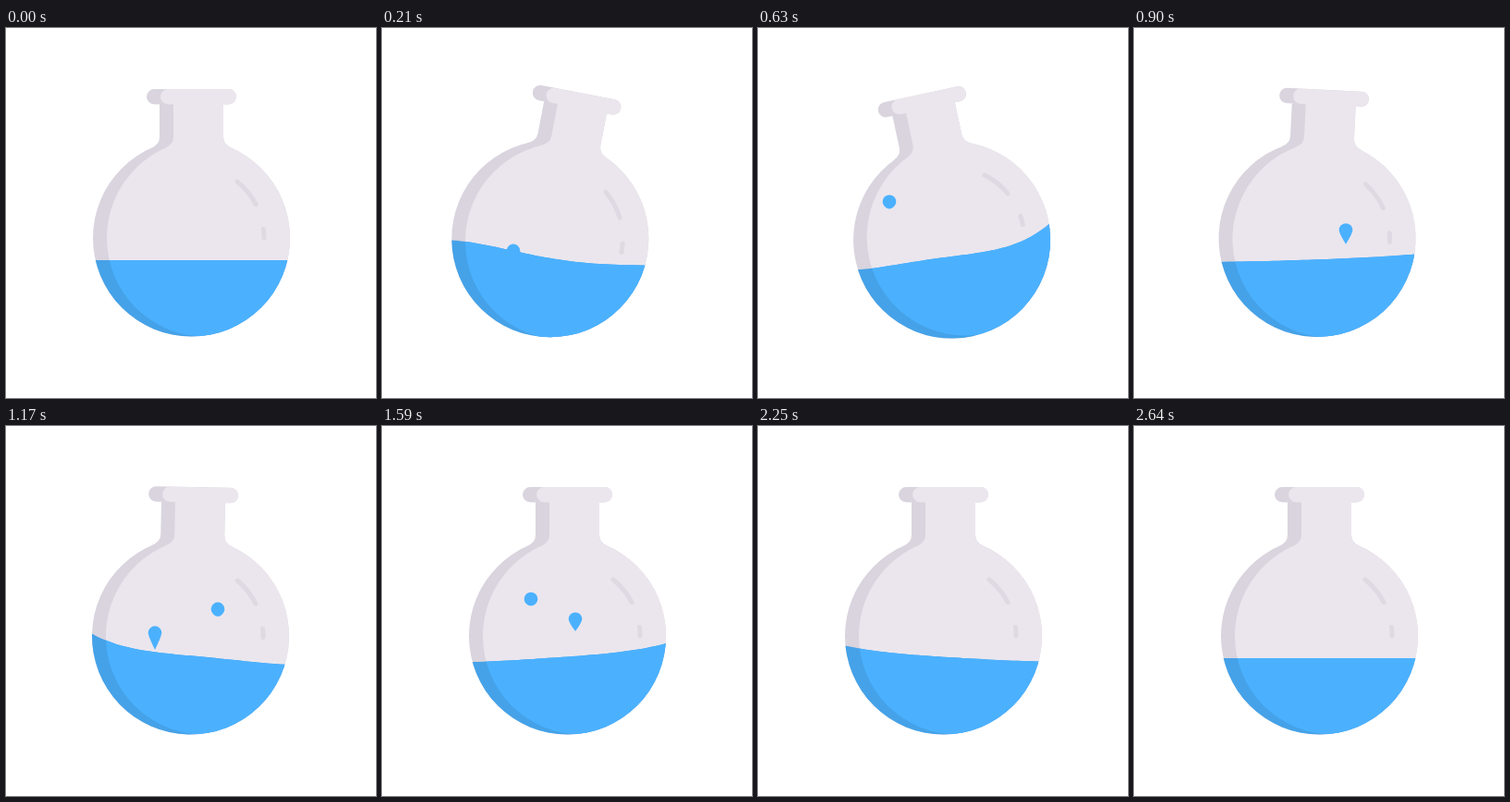
These frames come from a looping animation (400x400 px, 4.7 s). An HTML page with a canvas:

```html
<!DOCTYPE html>
<html lang="en">
<head>
<meta charset="utf-8">
<title>Shaken flask</title>
<style>
  html, body { margin: 0; width: 100%; height: 100%; overflow: hidden; background: #fff; }
  canvas { display: block; }
</style>
</head>
<body>
<canvas id="stage" width="400" height="400"></canvas>
<script>
const ctx = document.getElementById('stage').getContext('2d');
const LOOP = 4700, STEP = 30;
const CX = 200.5, CY = 227, R = 106.5, SHIFT = 15, LEVEL = 251;
const GLASS = '#ebe6ed', GLASS_DARK = '#d9d4de', SHINE = '#ded9e2';
const BLUE = '#4bb1ff', BLUE_DARK = '#45a2e8';

// Turning points: [time, value]
const SWING = [[0, 0], [356, 17], [703, -15.6], [955, 5.2], [1270, 0]];
const SLOSH = [[0, 0], [400, 40], [660, -43], [1130, 27.5], [1530, -18], [1950, 22.5], [2640, 0]];

const DROPS = [
  { start: 205, x: 142, top: 187.5 },
  { start: 760, x: 229, top: 197.5 },
  { start: 1105, x: 161, top: 187 },
  { start: 1395, x: 209, top: 195.8 }
];
const RISE_TIME = 510, RISE = 55, DROP_R = 7.3;

function swingAt(keys, t) {
  const i = keys.findIndex(k => k[0] > t);
  if (i < 0) return 0;
  const [t0, v0] = keys[i - 1], [t1, v1] = keys[i];
  return v0 + (v1 - v0) * (1 - Math.cos(Math.PI * (t - t0) / (t1 - t0))) / 2;
}

// Smooth rise and fall between 0 and end
const bump = (t, end) => t < end ? Math.sin(Math.PI * t / end) ** 2 : 0;

function ball(x = 0) {
  const p = new Path2D();
  p.arc(x, 0, R, 0, 2 * Math.PI);
  return p;
}

function flask(x = 0) {
  const p = ball(x);
  p.closePath();
  p.moveTo(x - 34.5, -150);
  p.lineTo(x + 34.5, -150);
  p.lineTo(x + 34.5, -109);
  p.quadraticCurveTo(x + 34.5, -101, x + 44, -97);
  p.lineTo(x + 44, -60);
  p.lineTo(x - 44, -60);
  p.lineTo(x - 44, -97);
  p.quadraticCurveTo(x - 34.5, -101, x - 34.5, -109);
  p.closePath();
  p.roundRect(x - 48.5, -161, 97, 16.5, 8.25);
  return p;
}

// Dark shape, covered by a lighter copy moved right
function shaded(shape, dark, light) {
  ctx.save();
  ctx.fillStyle = dark;
  ctx.fill(shape());
  ctx.clip(shape());
  ctx.fillStyle = light;
  ctx.fill(shape(SHIFT));
  ctx.restore();
}

function shine(from, to) {
  ctx.beginPath();
  ctx.arc(0, 0, 78.5, from * Math.PI / 180, to * Math.PI / 180);
  ctx.stroke();
}

// Rises, slows down and draws in its tail
function drop(t, { start, x, top }) {
  const left = 1 - (t - start) / RISE_TIME;
  if (left <= 0 || left >= 1) return;
  const y = top + RISE * left ** 3;
  const tail = 14.5 * left ** 1.9, tip = y + DROP_R + tail;
  const round = 0.55 * DROP_R * (1 - Math.min(1, tail / 5));
  const side = y + 0.5 * DROP_R;
  ctx.beginPath();
  ctx.arc(x, y, DROP_R, Math.PI, 0);
  ctx.bezierCurveTo(x + DROP_R, side, x + round, tip, x, tip);
  ctx.bezierCurveTo(x - round, tip, x - DROP_R, side, x - DROP_R, y);
  ctx.fillStyle = BLUE;
  ctx.fill();
}

// The high side climbs the glass more than the low side sinks
function clipLiquid(x, t) {
  const slosh = swingAt(SLOSH, t), height = Math.abs(slosh);
  const curl = 0.01 * height * Math.tanh((540 - t) / 100);
  ctx.beginPath();
  for (let s = -1.1; s < 1.11; s += 0.05) {
    const u = -s * Math.sign(slosh);
    const lift = 0.1 + 0.63 * u + 0.27 * u * u + curl * u * (1 + u) * (1 - u * u);
    ctx.lineTo(x + s * R, LEVEL - height * lift);
  }
  ctx.lineTo(x + 1.1 * R, 400);
  ctx.lineTo(x - 1.1 * R, 400);
  ctx.clip();
}

function draw(t) {
  const angle = swingAt(SWING, t);
  const x = CX - 0.865 * angle - 14.3 * bump(t, 703);
  const y = CY + 2.3 * bump(t, 1060);
  const place = () => {
    ctx.translate(x, y);
    ctx.rotate(angle * Math.PI / 180);
  };
  ctx.fillStyle = '#fff';
  ctx.fillRect(0, 0, 400, 400);

  ctx.save();
  place();
  shaded(flask, GLASS_DARK, GLASS);
  ctx.strokeStyle = SHINE;
  ctx.lineWidth = 5;
  ctx.lineCap = 'round';
  shine(-51, -27.5);
  shine(-7, 0);
  ctx.restore();

  DROPS.forEach(d => drop(t, d));

  ctx.save();
  clipLiquid(x, t);
  place();
  shaded(ball, BLUE_DARK, BLUE);
  ctx.restore();
}

const begin = performance.now();
function tick() {
  const t = (performance.now() - begin) % LOOP;
  draw(Math.floor(t / STEP) * STEP);
  requestAnimationFrame(tick);
}
tick();
</script>
</body>
</html>
```
